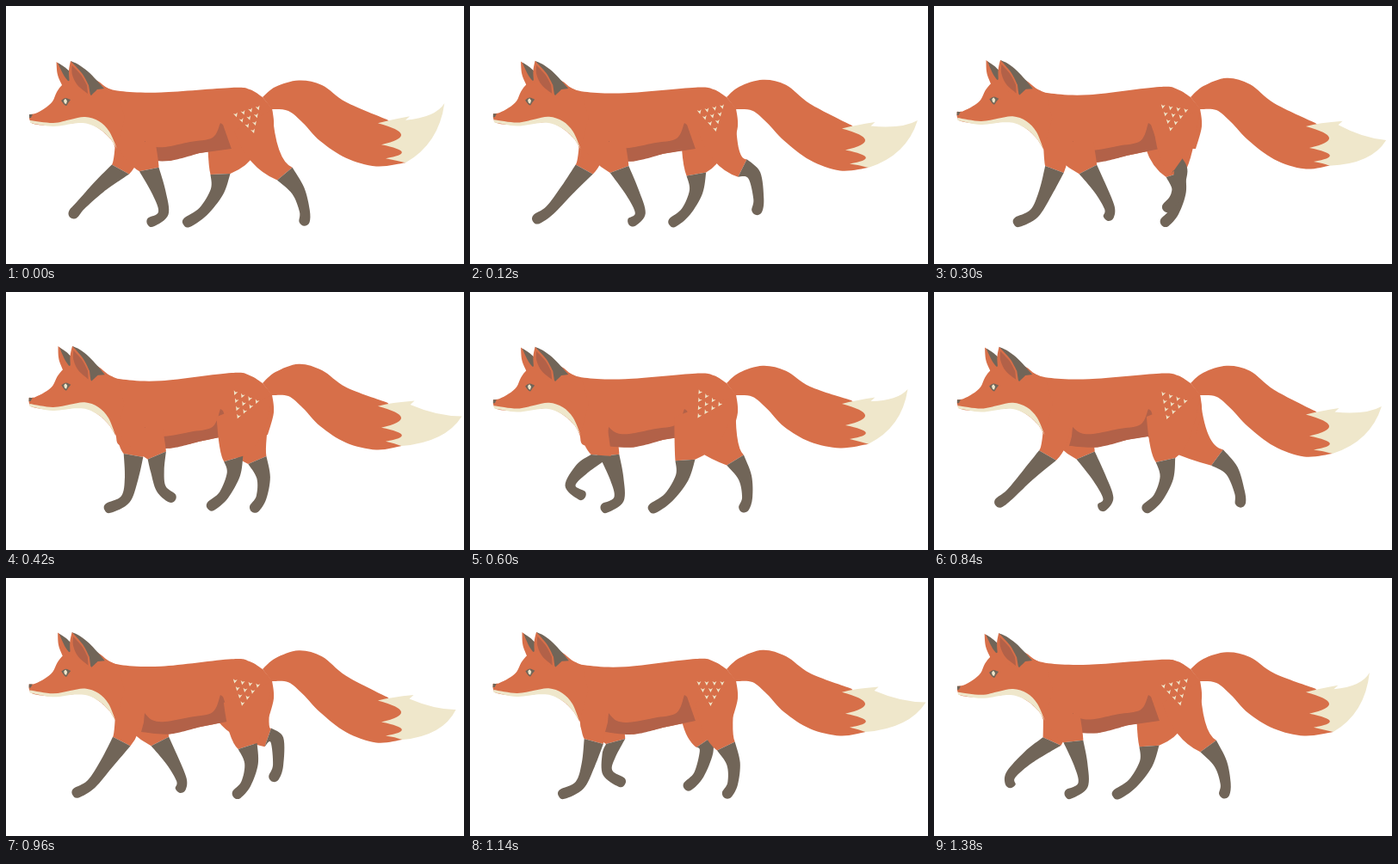
Animation, 532 px wide and 300 px high, one loop 1.44 s. Source, as an HTML page with a canvas:

```html
<!DOCTYPE html>
<html lang="en">
<head>
<meta charset="utf-8">
<title>Walking fox</title>
<style>
html, body { margin: 0; width: 100%; height: 100%; overflow: hidden; background: #fff; }
canvas { display: block; width: 532px; height: 300px; }
</style>
</head>
<body>
<canvas id="stage" width="532" height="300"></canvas>
<script>
const ctx = document.getElementById('stage').getContext('2d');
const ORANGE = '#d76f49', SHADE = '#b26148', SOCK = '#716558', CREAM = '#efe7cb';
const STEP = 60, CYCLE = 24, RAD = Math.PI / 180;

const wrap = t => (t % CYCLE + CYCLE) % CYCLE;
const wave = (phase, peak, period) => Math.cos(2 * Math.PI * (phase - peak) / period);
const ease = p => (1 - Math.cos(Math.PI * p)) / 2;
const easeOut = p => Math.sin(Math.PI * p / 2);

// 0 at the start of a stride, 1 at its rearmost point, then back to 0
function sweep(t, start, peak, rise, fall) {
  const time = wrap(t - start), span = peak - start;
  return time < span ? rise(time / span) : 1 - fall((time - span) / (CYCLE - span));
}

function bump(t, from, to) {
  const p = wrap(t - from) / (to - from);
  return p < 1 ? Math.sin(Math.PI * p) ** 2 : 0;
}

const frontSweep = t => sweep(t, 0.75, 16.5, ease, ease);
const hindSweep = t => sweep(t, 0, 14, p => p ** 0.9, easeOut);

// Sock top as two ends of a tilted line
function cuff(x, y, tilt, half) {
  const dx = half * Math.cos(tilt * RAD), dy = half * Math.sin(tilt * RAD);
  return { left: [x - dx, y - dy], right: [x + dx, y + dy] };
}

function frontPose(t) {
  const s = frontSweep(t), lead = frontSweep(t + 1), lift = bump(t, 12.5, 28.5);
  return {
    ...cuff(132 + 47 * s, 190, 30 - 57 * s, 11.5),
    shin: [108 + 86 * lead, 217 - 11 * lift],
    ankle: [87 + 118 * lead, 241 - 16 * lift],
    toe: [75 + 128 * s, 251.5 - 15 * lift]
  };
}

function hindPose(t) {
  const s = hindSweep(t), lift = bump(t, 12.5, 21);
  return {
    ...cuff(249 + 80 * s, 195.5 - 11 * lift, -3 - 38 * s - 45 * lift, 11.5),
    shin: [245 + 101 * s, 216 - 30 * lift],
    ankle: [229 + 126 * s, 239 - 23 * lift],
    toe: [210 + 146 * s, 252 - 21 * lift]
  };
}

// Smooth line through a flat list of coordinates, added to the current path
function spline(p) {
  const n = p.length / 2;
  const x = i => p[2 * Math.max(0, Math.min(n - 1, i))];
  const y = i => p[2 * Math.max(0, Math.min(n - 1, i)) + 1];
  ctx.lineTo(p[0], p[1]);
  for (let i = 0; i < n - 1; i++) {
    ctx.bezierCurveTo(
      x(i) + (x(i + 1) - x(i - 1)) / 6, y(i) + (y(i + 1) - y(i - 1)) / 6,
      x(i + 1) - (x(i + 2) - x(i)) / 6, y(i + 1) - (y(i + 2) - y(i)) / 6,
      x(i + 1), y(i + 1));
  }
}

function shape(color, ...lines) {
  ctx.beginPath();
  lines.forEach(spline);
  ctx.fillStyle = color;
  ctx.fill();
}

function drawSock({ left, right, shin, ankle, toe }) {
  const front = [...left], back = [...right];
  const addPair = ([x, y], from, to, half) => {
    const dx = to[0] - from[0], dy = to[1] - from[1];
    const k = half / Math.hypot(dx, dy);
    front.push(x - dy * k, y + dx * k);
    back.unshift(x + dy * k, y - dx * k);
  };
  const top = [(left[0] + right[0]) / 2, (left[1] + right[1]) / 2];
  addPair(shin, top, ankle, 7.8);
  addPair(ankle, shin, toe, 6);
  addPair(toe, ankle, toe, 6);
  const dx = toe[0] - ankle[0], dy = toe[1] - ankle[1];
  const reach = 4.5 / Math.hypot(dx, dy);
  shape(SOCK, [...front, toe[0] + dx * reach, toe[1] + dy * reach, ...back]);
}

// Upper leg between two body roots and the sock top
function drawThigh({ left, right }, rootL, bendL, bendR, rootR) {
  ctx.beginPath();
  ctx.moveTo(...rootL);
  ctx.quadraticCurveTo(...bendL, ...left);
  ctx.lineTo(...right);
  ctx.quadraticCurveTo(...bendR, ...rootR);
  ctx.fillStyle = ORANGE;
  ctx.fill();
}

function drawFrontLeg(pose) {
  const lx = pose.left[0], rx = pose.right[0];
  drawThigh(pose, [127, 158], [127 + (lx - 127) * 0.4, 182],
    [Math.max(156, rx), 182], [Math.max(158, rx - 4), 158]);
  drawSock(pose);
}

function drawHindLeg(pose, rootX, rootY) {
  drawThigh(pose, [rootX, rootY], [rootX + (pose.left[0] - rootX) * 0.3, 188],
    [Math.max(300, 306 + (pose.right[0] - 316) * 0.45), 180], [309, 120]);
  drawSock(pose);
}

function drawTorso(lift) {
  shape(ORANGE,
    [104, 87, 115, 94 + lift, 133, 99 + 2.5 * lift, 180, 100.5 + 3 * lift, 262, 95 - lift,
      283, 97, 298, 106],
    [309, 119, 311, 140, 304, 166],
    [262, 166, 225, 171 + 3 * lift, 190, 180 + 2 * lift],
    [157, 180, 132, 178, 127, 165, 118, 145, 95, 125]);
  shape(SHADE,
    [161, 157, 170, 163 + 3 * lift, 185, 164 + 4 * lift, 214, 158 + 5 * lift,
      240, 153 + 4 * lift, 249, 136],
    [252, 138, 262, 166],
    [225, 171 + 3 * lift, 190, 180 + 2 * lift, 157, 179],
    [160, 168, 161, 157]);
}

function drawTail(lift, phase) {
  const sway = -0.7 + 7.3 * wave(phase, 3, 12);
  const tipX = 519 + 10 * wave(phase, 5.5, 12) + 4 * wave(phase, 1.5, 6);
  const tipY = 133 + 23 * wave(phase, 5, 12);
  const endX = 464 - 5 * lift, endY = 183 + sway * 0.9;
  shape(ORANGE,
    [298, 106, 313, 94 - lift, 340, 86.5 - 3 * lift, 367, 92 - lift, 395, 112 + sway * 0.3,
      443, 133 + sway],
    [462, 151 + sway, 463, 168 + sway, endX, endY],
    [endX, endY, 430, 187 + sway * 0.8, 395, 177 + sway * 0.4, 365, 157 - lift,
      345, 136 - lift, 328, 122 - lift, 309, 120]);

  const wispX = 469 + 6 * lift, wispY = 129 + sway + 2 * lift;
  ctx.beginPath();
  ctx.moveTo(432, 137 + sway);
  ctx.quadraticCurveTo(447, 133 + sway, wispX, wispY);
  ctx.lineTo(wispX - 5, wispY + 4.5);
  ctx.quadraticCurveTo((wispX + tipX) / 2 + 10 - 12 * lift, (wispY + tipY) / 2 + 9, tipX, tipY);
  ctx.quadraticCurveTo((tipX + endX) / 2 + 16, (tipY + endY) / 2 + 13, endX, endY);
  ctx.quadraticCurveTo(452, endY - 3, 441, 178 + sway);
  ctx.quadraticCurveTo(481, 171 + sway, 436, 162 + sway);
  ctx.quadraticCurveTo(484, 151 + sway, 432, 137 + sway);
  ctx.fillStyle = CREAM;
  ctx.fill();
}

// Triangle of small notched marks that rocks with the near thigh
function drawFreckles(t) {
  const s = hindSweep(t);
  ctx.save();
  ctx.translate(274 + 9 * s, 130.5 - 4 * bump(t, 12.5, 21));
  ctx.rotate((32 - 53 * s) * RAD);
  ctx.fillStyle = CREAM;
  for (let row = 0; row < 4; row++) {
    for (let i = 0; i < 4 - row; i++) {
      const x = (i - (3 - row) / 2) * 9, y = (row - 1) * 8;
      ctx.beginPath();
      ctx.moveTo(x - 2.5, y - 2.4);
      ctx.lineTo(x, y - 1);
      ctx.lineTo(x + 2.5, y - 2.4);
      ctx.lineTo(x, y + 2.6);
      ctx.fill();
    }
  }
  ctx.restore();
}

function drawHead(lift) {
  ctx.save();
  ctx.translate(80, 118 - 1.2 * lift);
  ctx.rotate(0.04 * lift);
  ctx.translate(-80, -118);

  // Far ear
  shape(ORANGE, [58.5, 65, 60, 80, 66, 94], [80, 92, 75, 78], [67, 71, 58.5, 65]);
  shape(SOCK, [60, 66, 68, 71, 76, 78], [75, 90, 68, 82, 60, 66]);

  shape(ORANGE,
    [27, 126, 34, 125, 45, 119, 54, 111, 59, 100, 66, 91, 75, 86],
    [90, 82, 106, 87, 117, 95, 130, 101],
    [138, 130, 129, 166],
    [122, 155, 110, 144, 95, 136, 80, 136, 55, 139, 32, 137, 27, 131]);
  shape(CREAM,
    [28, 133, 55, 136, 75, 132, 92, 129, 108, 134, 120, 146, 129, 166],
    [122, 155, 110, 144, 95, 137, 80, 136.5, 55, 140, 28, 136]);

  // Near ear
  shape(SOCK, [75, 64, 84, 68, 95, 76, 105, 86, 114, 96], [106, 97, 99, 104], [92, 98, 75, 64]);
  shape(ORANGE, [75, 64, 73, 76, 74, 90], [84, 100, 98, 104], [96, 92, 88, 78, 75, 64]);
  shape(SHADE, [76.5, 69, 77, 80, 83, 92, 95, 102], [94, 92, 87, 80, 76.5, 69]);

  // Eye and nose
  shape(SOCK, [64, 110, 69, 107, 75, 109], [72, 113, 70, 116, 67, 114, 64, 110]);
  shape(CREAM, [67, 110, 69, 108, 71, 110.5], [70, 114, 68, 113, 67, 110]);
  shape(SOCK, [27, 126, 31, 126], [29, 130, 27, 130]);
  ctx.restore();
}

function draw(frame) {
  const phase = frame % (CYCLE / 2);
  const lift = ease(phase / 6);
  const nearHindTime = frame + 13;
  const farHind = hindPose(frame), nearHind = hindPose(nearHindTime);

  ctx.fillStyle = '#fff';
  ctx.fillRect(0, 0, 532, 300);
  drawFrontLeg(frontPose(frame));
  drawHindLeg(farHind, Math.min(246, farHind.left[0] - 3), 166);
  drawTail(lift, phase);
  drawTorso(lift);
  drawFrontLeg(frontPose(frame + 11));
  drawHindLeg(nearHind, Math.min(265, 238 + (nearHind.left[0] - 240) * 0.5), 145);
  drawFreckles(nearHindTime);
  drawHead(lift);
}

function tick() {
  draw(Math.floor(performance.now() / STEP) % CYCLE);
  requestAnimationFrame(tick);
}
tick();
</script>
</body>
</html>
```
